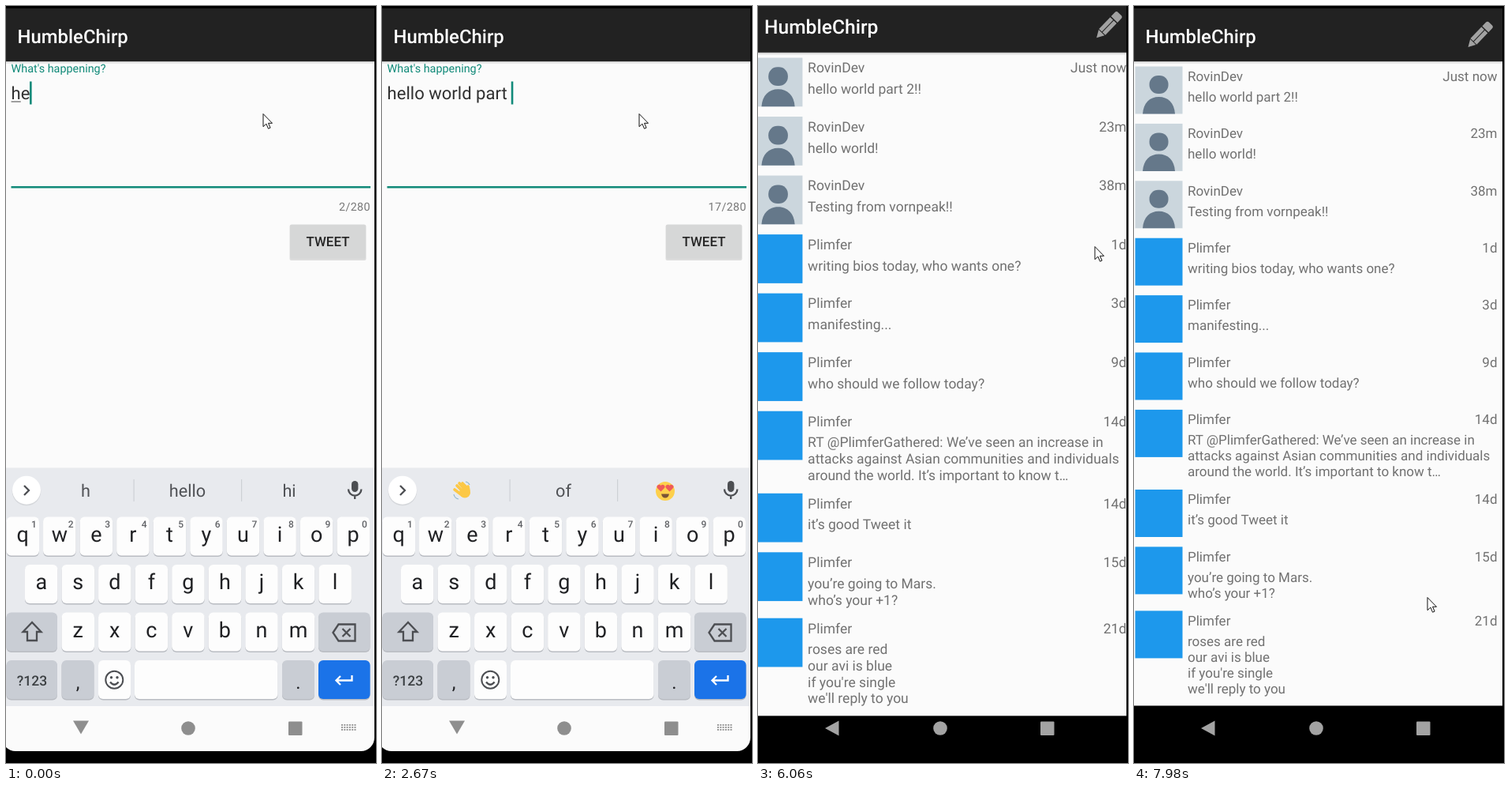
Recreate the animation shown at these times as an HTML page. Size 469 px wide and 958 px high, loop 8 s.

```html
<!DOCTYPE html>
<html lang="en">
<head>
<meta charset="utf-8">
<title>Compose and post</title>
<style>
  html, body { margin: 0; width: 100%; height: 100%; overflow: hidden; background: #000; }
  svg { display: block; width: 100%; height: 100%; }
  text { font-family: Roboto, sans-serif; white-space: pre; text-rendering: geometricPrecision; }
  .line { fill: none; stroke: #4c4e52; stroke-width: 2.3; }
</style>
</head>
<body>
<svg id="stage" viewBox="0 0 469 958"></svg>
<script>
const LOOP = 8000;
const TITLE = 'HumbleChirp', USER = 'RovinDev', BRAND = 'Plimfer';
const ICON = '#4c4e52', TEAL = '#118a79', PAGE = '#fbfbfb', SLATE = '#65788a';
const INPUT_SIZE = 22.05, INPUT_X = 6.6;

// start time, input text, underlined letters of the last word, suggestions ('' = emoji, null = toolbar)
const TYPING = [
  [0, 'he', 1, 'h|hello|hi'],
  [120, 'hel', 2, 'he|hello|hey'],
  [270, 'hell', 3, 'hel|hello|help'],
  [390, 'hello', 4, 'hell|hello|hells'],
  [540, 'hello', 5, 'hello|hello|hellos'],
  [690, 'hello ', 0, 'hello|hello|hellos'],
  [810, 'hello ', 0, '|and|'],
  [1090, 'hello w', 0, '|and|'],
  [1210, 'hello wo', 1, 'w|we|with'],
  [1330, 'hello wor', 2, 'wo|would|work'],
  [1480, 'hello worl', 3, 'wor|work|world'],
  [1600, 'hello world', 4, 'worl|world|work'],
  [1750, 'hello world', 5, 'world|world|worlds'],
  [1990, 'hello world ', 0, 'world|world|worlds'],
  [2250, 'hello world p', 0, '|and|'],
  [2370, 'hello world pa', 1, 'p|part|please'],
  [2520, 'hello world part', 3, 'par|part|party'],
  [2670, 'hello world part ', 0, '|of|'],
  [3200, 'hello world part 2', 0, '|of|'],
  [3320, 'hello world part 2', 0, null],
  [3910, 'hello world part 2!', 0, null],
  [4190, 'hello world part 2!!', 0, null]
];
const CARET_OFF = [[3630, 3910], [4710, 5230], [5740, LOOP]];
const POINTER = [
  [0, 326, 136], [4820, 326, 136], [5230, 446, 343], [5360, 446, 343], [5640, 427, 304],
  [6290, 427, 304], [6750, 235, 117], [6900, 233, 116], [7560, 233, 116], [7980, 372, 748]
];
const LIST_START = 6060;

const POSTS = [
  [USER, 'Just now', 'hello world part 2!!'],
  [USER, '23m', 'hello world!'],
  [USER, '38m', 'Testing from vornpeak!!'],
  [BRAND, '1d', 'writing bios today, who wants one?'],
  [BRAND, '3d', 'manifesting...'],
  [BRAND, '9d', 'who should we follow today?'],
  [BRAND, '14d', `RT @${BRAND}Gathered: We’ve seen an increase in`,
    'attacks against Asian communities and individuals',
    'around the world. It’s important to know t…'],
  [BRAND, '14d', 'it’s good Tweet it'],
  [BRAND, '15d', 'you’re going to Mars.', 'who’s your +1?'],
  [BRAND, '21d', 'roses are red', 'our avi is blue', "if you're single", "we'll reply to you"]
];

const rect = (x, y, w, h, fill, extra = '') =>
  `<rect x="${x}" y="${y}" width="${w}" height="${h}" fill="${fill}" ${extra}/>`;
const circle = (x, y, r, fill, extra = '') =>
  `<circle cx="${x}" cy="${y}" r="${r}" fill="${fill}" ${extra}/>`;
const path = (d, extra = 'class="line"') => `<path d="${d}" ${extra}/>`;
const text = (x, y, size, fill, str, anchor = 'start', extra = '') =>
  `<text x="${x}" y="${y}" font-size="${size}" fill="${fill}" text-anchor="${anchor}" ${extra}>${str}</text>`;
const group = (id, body) => `<g id="${id}">${body}</g>`;
const MEDIUM = 'font-weight="500"';

function appBar() {
  return rect(0, 3, 467, 67, '#222') + rect(0, 70, 467, 1, '#000', 'opacity=".25"') +
    rect(0, 71, 467, 2, '#000', 'opacity=".07"') + text(14.5, 46.5, 23.9, '#fff', TITLE, 'start', MEDIUM);
}

function key(x, y, w, label = '', fill = '#fdfdfd') {
  return rect(x, y + 1, w, 49.5, '#b9bcc2', 'rx="6"') + rect(x, y, w, 49, fill, 'rx="6"') +
    text(x + w / 2, y + 31, 27, '#202124', label, 'middle');
}

function keyRow(letters, x, y, hints = '') {
  return [...letters].map((c, i) => {
    const left = x + i * 46.55;
    const hint = hints ? text(left + 35, y + 13, 12, '#606266', hints[i], 'middle', MEDIUM) : '';
    return key(left, y, 41.5, c) + hint;
  }).join('');
}

function emoji() {
  const heart = x => path(`M${x} 614.5l-4.5-4.5a2.5 2.5 0 0 1 4.500-3a2.500 2.500 0 0 1 4.500 3z`, 'fill="#ee5a5a"');
  const hand = 'fill="none" stroke="#fcc846" stroke-width="3.6" stroke-linecap="round"';
  return path('M104 616L95 607M106 613L98 604M109 611L102 604M110 613L109 608M100 618L92 612', hand) +
    '<ellipse cx="105" cy="616" rx="7" ry="6.500" fill="#fcc846"/>' +
    path('M91 618q1 5 6 6M106 602q4 1 5 4', 'fill="none" stroke="#8fb8d0" stroke-width="1.2"') +
    circle(359, 614, 12, '#fdd04c') + heart(353.5) + heart(364.5) +
    path('M354 617.500h10q-1 5-5 5t-5-5z', 'fill="#7a5335"');
}

function toolbar() {
  return path('M29 607l-6 6 6 6') +
    circle(85.5, 610, 6.3, 'none', 'class="line"') + path('M90 615l8 8') +
    path('M149 603h12q3 0 3 3v9l-7 7h-8q-3 0-3-3v-13q0-3 3-3zM164 614h-4q-3 0-3 3v4M150 613q4 5 7 1') +
    circle(151, 608.5, 1.4, ICON) + circle(159, 608.5, 1.4, ICON) +
    path('M218 607.5h-7q-2 0-2 2v6q0 2 2 2h6v-5h-3M224 606v13M229 619v-11.5h7M229 613h6') +
    rect(282, 604, 17, 19, 'none', 'class="line" rx="1.5"') + rect(286, 601, 9, 6, ICON, 'rx="2"') +
    path('M286 610.5h9M286 614.5h9M286 618.5h6', `stroke="${ICON}" stroke-width="1.8"`) +
    rect(332, 599, 1.2, 28, '#cdd0d5') +
    [367, 374.5, 382].map(x => circle(x, 613, 2.5, ICON)).join('');
}

function suggestions() {
  return path('M23 607l6 6-6 6') + rect(161.5, 599, 1.2, 28, '#cdd0d5') + rect(298, 599, 1.2, 28, '#cdd0d5') +
    [101, 230, 359].map(x => text(x, 621, 21.7, '#505256', '', 'middle', 'class="word"')).join('') +
    group('emoji', emoji());
}

function keyboard() {
  const grey = '#c9cdd4';
  return rect(0, 585, 467, 301, '#e8eaee') + rect(0, 584, 467, 1, '#f0f1f3') +
    circle(26, 614, 18.3, '#d5d7db') + circle(26, 612.7, 18, '#fff') +
    group('suggestions', suggestions()) + group('toolbar', toolbar()) +
    rect(438, 601, 8.4, 14, ICON, 'rx="4.2"') + path('M434 611.5a8.2 8.2 0 0 0 16.4 0M442.2 619v5') +
    keyRow('qwertyuiop', 0.5, 646.5, '1234567890') + keyRow('asdfghjkl', 24, 707) + keyRow('zxcvbnm', 70.5, 767.5) +
    key(0.5, 767.5, 64.5, '', grey) + path('M33 780L21.5 792H27v11h12v-11h5.5z') +
    key(396, 767.5, 65.5, '', grey) + path('M414.5 793l7-10.5H442.5v21H421.5zM426.5 788l10 10m0-10l-10 10') +
    key(0.5, 828, 64.5, '', grey) + text(33, 859.5, 17.5, '#3c4043', '?123', 'middle', MEDIUM) +
    key(70.5, 828, 41, '', grey) + text(91, 864, 24, '#202124', ',', 'middle') +
    key(117, 828, 41) + circle(137.3, 852.7, 11, 'none', 'class="line" style="stroke-width:2"') +
    circle(133.5, 849.7, 1.7, ICON) + circle(141, 849.7, 1.7, ICON) + path('M132 855.5q5.3 6.5 10.6 0') +
    key(163, 828, 181.5) + key(350, 828, 41, '', grey) + text(370.5, 864, 24, '#202124', '.', 'middle') +
    key(396, 828, 65.5, '', '#1b73e8') +
    path('M438.5 847v6.500h-20m5.500-5.500l-5.500 5.500 5.500 5.500', 'fill="none" stroke="#fff" stroke-width="2.3"');
}

function navButtons(fill, back) {
  return path(back, `fill="${fill}"`) + circle(231, 914, 8.8, fill) + rect(358, 905.5, 17.5, 17.5, fill, 'rx="1"');
}

function composeScreen() {
  let dots = '';
  for (let i = 0; i < 18; i++) dots += rect(425 + i % 6 * 3.3, 909 + Math.floor(i / 6) * 3, 2, 1.8, '#909090');
  return rect(-5, 40, 472, 903, PAGE, 'rx="17"') + appBar() +
    text(6.5, 84, 14.4, TEAL, "What's happening?") +
    text(INPUT_X, 118.3, INPUT_SIZE, '#303030', '', 'start', 'id="input"') +
    rect(0, 120.5, 0, 1.1, '#555', 'id="underline"') + rect(0, 95.5, 2.6, 29, TEAL, 'id="caret"') +
    rect(6.5, 228, 455.5, 2.5, TEAL) +
    text(462, 259, 14.3, '#777', '', 'end', 'id="counter" letter-spacing=".4"') +
    rect(359.5, 277, 97, 45, '#000', 'opacity=".12" rx="2"') + rect(360, 276.5, 96, 43.5, '#d6d7d7', 'id="button" rx="2"') +
    text(408, 304, 16.9, '#252525', 'TWEET', 'middle', MEDIUM) +
    keyboard() + navButtons('#8e8e8e', 'M85 904.5h20l-10 17z') + dots;
}

function userAvatar(y) {
  return rect(1.5, y, 60, 60, '#cbd6dd') + rect(19.5, y + 11.5, 24, 23, SLATE, 'rx="11"') +
    path(`M11 ${y + 60}c1-14 9-21.500 20.500-21.500s19.500 7.500 20.500 21.500z`, `fill="${SLATE}"`);
}

function listScreen() {
  let top = 76.5;
  const rows = POSTS.map(([name, age, ...lines]) => {
    const avatar = name === USER ? userAvatar(top) : rect(1.5, top, 60, 60, '#1d98ec');
    const body = lines.map((line, i) => text(68, top + 44.3 + i * 20.1, 17, '#717171', line)).join('');
    const row = avatar + text(68, top + 18.3, 17, '#717171', name) + text(460.5, top + 18.3, 17, '#717171', age, 'end') + body;
    top += lines.length === 1 ? 72.4 : 40.8 + lines.length * 20.1;
    return row;
  }).join('');
  const pencil = `<g transform="translate(423.5 52) rotate(-46)" fill="#a2a2a2">
    <path d="M0 0L9-5V5zM10-5.5H30V-.5H10zM10 .5H30V5.5H10zM31.5-5.5h6.500q3 0 3 3v5q0 3-3 3h-6.500z"/></g>`;
  return rect(0, 880, 467, 78, '#000') +
    group('page', rect(0, 3, 467, 882.5, PAGE) + appBar() + pencil + rows) +
    navButtons('#a3a3a3', 'M85 914l17.5-9.5v19z');
}

const stage = document.getElementById('stage');
stage.innerHTML = '<clipPath id="screen"><rect width="467" height="958"/></clipPath>' + rect(0, 0, 469, 958, '#000') +
  `<g clip-path="url(#screen)">${group('compose', composeScreen())}${group('list', listScreen())}</g>` +
  path('M0 0V16.2L3.9 12.6 6.5 18.7 9.1 17.6 6.5 11.8H11.5z',
    'id="pointer" fill="#fff" stroke="#111" stroke-width="1"');

const el = id => document.getElementById(id);
const show = (id, on) => el(id).style.display = on ? '' : 'none';
const set = (id, attrs) => Object.entries(attrs).forEach(([k, v]) => el(id).setAttribute(k, v));
const ruler = document.createElement('canvas').getContext('2d');
ruler.font = `${INPUT_SIZE}px Roboto, sans-serif`;
const widthOf = str => ruler.measureText(str).width;

function pointerAt(t) {
  const i = POINTER.findLastIndex(p => p[0] <= t);
  const [t0, x0, y0] = POINTER[i], [t1, x1, y1] = POINTER[i + 1] || [LOOP, x0, y0];
  const k = (t - t0) / (t1 - t0), e = k * k * (3 - 2 * k);
  return [x0 + (x1 - x0) * e, y0 + (y1 - y0) * e + 0.5];
}

function drawCompose(t) {
  const [, str, marked, words] = TYPING.findLast(s => s[0] <= t);
  const wordStart = str.lastIndexOf(' ') + 1;
  el('input').textContent = str;
  el('counter').textContent = `${str.length}/280`;
  set('underline', {
    x: INPUT_X + widthOf(str.slice(0, wordStart)),
    width: widthOf(str.slice(wordStart, wordStart + marked))
  });
  set('caret', { x: INPUT_X + widthOf(str) - 0.4 });
  show('caret', !CARET_OFF.some(([a, b]) => t >= a && t < b));
  set('button', { fill: t >= 5790 ? '#cdcece' : '#d6d7d7' });
  show('toolbar', words === null);
  show('suggestions', words !== null);
  if (words !== null) {
    const list = words.split('|');
    document.querySelectorAll('.word').forEach((node, i) => node.textContent = list[i]);
    show('emoji', list[0] === '');
  }
}

function draw(t) {
  const posted = t >= LIST_START;
  show('compose', !posted);
  show('list', posted);
  if (posted) {
    const scale = 1 + 0.03 * Math.exp((LIST_START - t) / 55);
    set('page', { transform: `translate(233.5 450) scale(${scale}) translate(-233.5 -450)` });
  } else {
    drawCompose(t);
  }
  set('pointer', { transform: `translate(${pointerAt(t)})` });
}

const start = performance.now();
function tick() {
  draw((performance.now() - start) % LOOP);
  requestAnimationFrame(tick);
}
tick();
</script>
</body>
</html>
```
